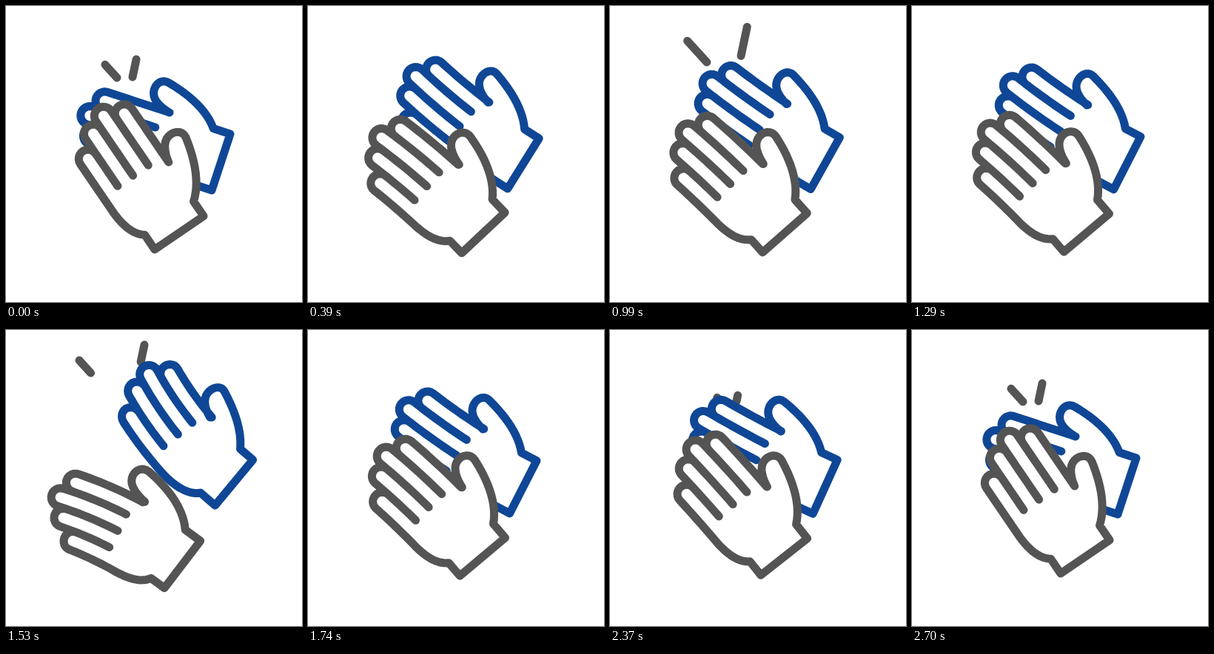
These frames come from a looping animation (400 by 400 pixels, 5730 ms). An HTML page:

```html
<!DOCTYPE html>
<html lang="en">
<head>
<meta charset="utf-8">
<title>Clapping hands</title>
<style>
  html, body { margin: 0; width: 100%; height: 100%; overflow: hidden; background: #fff; }
  svg { display: block; width: 100%; height: 100%; }
  path, line { stroke-width: 11; stroke-linecap: round; stroke-linejoin: round; }
  path { fill: #fff; }
  .grey { stroke: #545454; }
  .blue { stroke: #0f4796; }
</style>
</head>
<body>
<svg viewBox="0 0 400 400">
  <line class="grey"/>
  <line class="grey"/>
  <path class="blue"/>
  <path class="grey"/>
</svg>
<script>
const LOOP = 5730, STEP = 30, LAST = 90;
const CLAP = 15, WIDE = 7, FIRST_WIDE = 10;   // in steps
const SLOW = 5 * 15 - 8;                      // the last clap eases out from here

const mix = (a, b, q) => a + (b - a) * q;
const clamp = q => Math.min(1, Math.max(0, q));
const ease = q => (1 - Math.cos(Math.PI * clamp(q))) / 2;

// Sampled Bezier curve of any degree
function curve(...pts) {
  return Array.from({ length: 13 }, (_, i) => {
    let p = pts;
    while (p.length > 1) p = p.slice(1).map((b, j) => b.map((v, k) => mix(p[j][k], v, i / 12)));
    return p[0];
  });
}

// Straight hand: wrist centre at 0,0, fingers upwards along y
const LEFT = -58, WIDTH = 25, ROOT = 99;
const KNUCKLES = [152, 176, 188, 175];        // little finger to index
const CROTCH = [42, 87];

const edge = i => LEFT + WIDTH * i;
const fingers = KNUCKLES.flatMap((y, i) =>
  curve([edge(i), i ? y : 72], [edge(i), y]).concat(
    Array.from({ length: 13 }, (_, j) => {
      const a = Math.PI * j / 12, r = WIDTH / 2;
      return [edge(i) + r - r * Math.cos(a), y + r * Math.sin(a)];
    })));
const palm = [
  ...curve([-40, 24], [-57, 36], [LEFT, 72]),
  ...fingers,
  ...curve([edge(4), KNUCKLES[3]], CROTCH)
];
const thumb = [
  ...curve(CROTCH, [45, 102], [52, 110]),
  ...curve([52, 110], [62, 122], [83, 116], [80, 101]),
  ...curve([80, 101], [68, 46], [40, 24])
];
const wrist = [[40, 0], [-40, 0]];
const gaps = [1, 2, 3].map(i =>
  curve([edge(i), ROOT], [edge(i), Math.min(KNUCKLES[i - 1], KNUCKLES[i])]));

// Wrist centre and angle when closed, half open, open
const HANDS = [
  { bend: 0.0021, keys: [[290.5, 211, -71.8], [291, 213, -57.5], [310, 205.5, -49.6]] },
  { bend: -0.0019, keys: [[234, 306.5, -34.3], [237, 306.5, -43.5], [238.5, 318, -53.7]] }
];
const RAYS = [[150, 97, 99, 41], [171, 96, 187, 20]];
const RAY_REST = 0.315;

function outline({ bend, keys }, open, curl) {
  const i = open < 0.5 ? 0 : 1;
  const [cx, cy, deg] = keys[i].map((v, n) => mix(v, keys[i + 1][n], open * 2 - i));
  const cos = Math.cos(deg * Math.PI / 180), sin = Math.sin(deg * Math.PI / 180);
  // Bends the hand along a circle, then places it
  const trace = (pts, amount = 1) => pts.map(([x, y]) => {
    const a = bend * curl * amount * y;
    const u = a * y / 2 + x * Math.cos(a), v = y * (1 - a * a / 6) - x * Math.sin(a);
    return (cx + u * cos + v * sin).toFixed(2) + ' ' + (cy + u * sin - v * cos).toFixed(2);
  }).join('L');
  const body = [trace(palm), trace(thumb, 0.75), trace(wrist)].join('L');
  return `M${body}Z` + gaps.map(g => 'M' + trace(g)).join('');
}

// Position within a clap, 0 to CLAP
function phase(step) {
  if (step <= SLOW) return step % CLAP;
  const q = (step - SLOW) / (LAST - SLOW);
  return WIDE + (CLAP - WIDE) * (1 - (1 - q) ** 2.4);
}

function state(step) {
  const p = phase(step), wide = step < CLAP ? FIRST_WIDE : WIDE;
  const opening = p < wide;
  const open = opening ? ease(p / wide) : 1 - ((p - wide) / (CLAP - wide)) ** 1.29;
  const curl = opening ? open : ease((CLAP - p) / 4);
  const flying = p < 10.5;
  const tail = flying ? 1 - (1 - p / 10.5) ** 1.4 : 0;
  const head = flying
    ? 1 - (1 - RAY_REST) * (1 - clamp(p / 5)) ** 2
    : RAY_REST * clamp((p - 13) / 2);
  return { open, curl, tail, head };
}

const lines = [...document.querySelectorAll('line')];
const paths = [...document.querySelectorAll('path')];

function draw(step) {
  const { open, curl, tail, head } = state(step);
  paths.forEach((el, i) => el.setAttribute('d', outline(HANDS[i], open, curl)));
  lines.forEach((el, i) => {
    const [x1, y1, x2, y2] = RAYS[i];
    el.setAttribute('x1', mix(x1, x2, tail));
    el.setAttribute('y1', mix(y1, y2, tail));
    el.setAttribute('x2', mix(x1, x2, head));
    el.setAttribute('y2', mix(y1, y2, head));
    el.setAttribute('visibility', head > 0 ? 'visible' : 'hidden');
  });
}

let begin;
function tick(now) {
  begin ??= now;
  draw(Math.min(LAST, Math.floor((now - begin) % LOOP / STEP)));
  requestAnimationFrame(tick);
}
draw(0);
requestAnimationFrame(tick);
</script>
</body>
</html>
```
